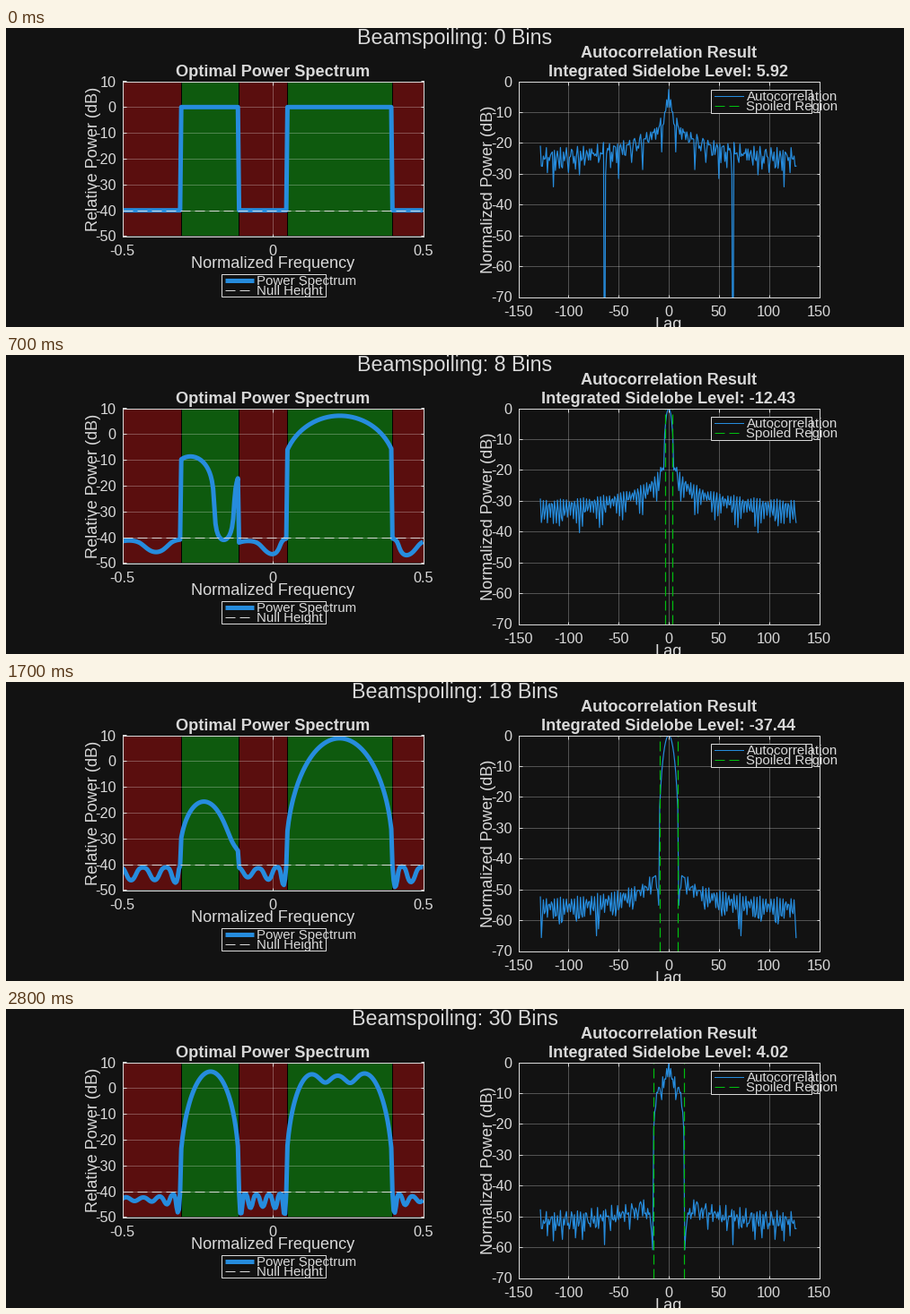
These frames come from a looping animation (1000x334 px, 3000 ms). A matplotlib script:

```python
import numpy as np
import matplotlib.pyplot as plt
from matplotlib.animation import FuncAnimation
from matplotlib.lines import Line2D
from matplotlib.patches import Rectangle

W, H, DPI = 1000, 334, 100
BG, FG, BLUE, GREEN = "#121212", "#d9d9d9", "#268cdd", "#00c010"
N = 256
NULL = 1e-4      # null height, -40 dB
WEIGHT = 2.8e5   # sidelobe norm against the log barrier

plt.rcParams.update({"font.family": "Liberation Sans", "axes.unicode_minus": False,
                     "text.color": FG})

bins = np.arange(N)
freq = np.linspace(-0.5, 0.5, N)
lag = bins - N // 2
in_band = ((bins >= 50) & (bins <= 98)) | ((bins >= 140) & (bins <= 228))
null = ~in_band

LEVELS = [5.92, 2.06, -2.31, -7.14, -12.43, -17.87, -22.86, -27.78,
          -32.65, -37.44, -36.18, -31.09, -20.42, -9.63, -1.28, 4.02]


# ---------- spectrum design ----------
def sidelobe_projector(half):
    """Matrix that keeps only the lags beyond +-half."""
    n = np.subtract.outer(bins, bins)
    kernel = np.ones((N, N))
    for k in range(1, half + 1):
        kernel += 2 * np.cos(2 * np.pi * k * n / N)
    return np.eye(N) - kernel / N


def barrier_weights(half):
    """Wide spoiled regions are held further from the exact optimum."""
    return np.where(in_band, np.exp(0.6 * max(0, half - 9)), 1.0)


def cost(p, A, m):
    return (WEIGHT * np.linalg.norm(A @ p) - (m * np.log(p)).sum()
            - np.log(NULL - p[null]).sum())


def optimise(p, half, steps=50):
    """Damped Newton steps for the smallest sidelobes at fixed total power."""
    A, m = sidelobe_projector(half), barrier_weights(half)
    for _ in range(steps):
        e = A @ p
        t = WEIGHT / np.linalg.norm(e)
        room = NULL - p[null]
        grad = t * e - m / p
        grad[null] += 1 / room
        diag = m.copy()
        diag[null] += (p[null] / room) ** 2
        hess = t * A * np.outer(p, p) + np.diag(diag)
        a, b = np.linalg.solve(hess, np.column_stack([p * grad, p])).T
        u = (p @ a) / (p @ b) * b - a
        if np.abs(u).max() < 1e-4:
            break
        reach = max((-u).max(), (u[null] * p[null] / room).max(), 1e-9)
        step = min(1, 0.95 / reach)
        now = cost(p, A, m)
        while step > 1e-4 and cost(p * (1 + step * u), A, m) > now:
            step /= 2
        p = p * (1 + step * u)
    return p


def design_all():
    spectra = [np.where(in_band, 1.0, NULL)]
    p = np.full(N, NULL / 2)
    p[in_band] = (N - p[null].sum()) / in_band.sum()
    for half in range(1, len(LEVELS)):
        p = optimise(p, half)
        spectra.append(p)
    return spectra


def db(x):
    return 10 * np.log10(np.maximum(np.abs(x), 1e-12))


spectra = design_all()
powers = [db(p) for p in spectra]
correlations = [db(np.fft.fftshift(np.fft.ifft(p))) for p in spectra]


# ---------- layout, in pixels from the top left ----------
fig = plt.figure(figsize=(W / DPI, H / DPI), dpi=DPI, facecolor=BG)


def pt(px):
    return px * 72 / DPI


def text(x, y, s, size, **kw):
    kw.setdefault("va", "baseline")
    return fig.text(x / W, 1 - y / H, s, fontsize=pt(size), **kw)


def plot_area(x0, y0, x1, y1, xlim, ylim, xticks, yticks):
    ax = fig.add_axes([x0 / W, 1 - y1 / H, (x1 - x0) / W, (y1 - y0) / H], facecolor=BG)
    ax.set(xlim=xlim, ylim=ylim)
    ax.set_xticks(xticks, [f"{v:g}" for v in xticks])
    ax.set_yticks(yticks, [f"{v:g}" for v in yticks])
    ax.tick_params(direction="in", top=True, right=True, length=pt(3.5), width=pt(1),
                   color=FG, labelcolor=FG, labelsize=pt(16.2))
    ax.tick_params(axis="x", pad=pt(9.5))
    ax.tick_params(axis="y", pad=pt(7))
    ax.set_axisbelow(True)
    ax.grid(color="white", alpha=0.27, lw=pt(1))
    for s in ax.spines.values():
        s.set(color=FG, linewidth=pt(1))
    return ax


def dashes(px):
    return (0, (pt(11) / pt(px), pt(5) / pt(px)))


def sample(x0, x1, y, **kw):
    fig.add_artist(Line2D([x0 / W, x1 / W], [1 - y / H] * 2, zorder=11, **kw))


def legend(x, y, w, h, rows):
    fig.add_artist(Rectangle((x / W, 1 - (y + h) / H), w / W, h / H, facecolor=BG,
                             edgecolor=FG, lw=pt(1), zorder=10))
    for (label, style), row in zip(rows, (7, 18.5)):
        sample(x + 4, x + 36, y + row, **style)
        text(x + 39.5, y + row + 5.3, label, 15, zorder=12)


left = plot_area(129.5, 59.5, 464.5, 232.5, (-0.5, 0.5), (-50, 10),
                 (-0.5, 0, 0.5), range(-50, 11, 10))
right = plot_area(570.5, 59.5, 905.5, 300.5, (-150, 150), (-70, 0),
                  range(-150, 151, 50), range(-70, 1, 10))

edges = [-0.5, -0.304, -0.114, 0.0486, 0.397, 0.5]
for i, (a, b) in enumerate(zip(edges, edges[1:])):
    color = "#0e5a0e" if i % 2 else "#5a0e0e"
    left.add_patch(Rectangle((a, -50), b - a, 60, facecolor=color, edgecolor="black",
                             lw=pt(1), zorder=0.2))

power_line, = left.plot([], [], color=BLUE, lw=pt(5), solid_joinstyle="round",
                        solid_capstyle="butt", zorder=2.2)
left.axhline(-40, color=FG, lw=pt(1), ls=dashes(1), zorder=2.3)

corr_line, = right.plot([], [], color=BLUE, lw=pt(1.2), zorder=2.2)
limits = [right.axvline(0, color=GREEN, lw=pt(1.2), ls=dashes(1.2), zorder=2.3)
          for _ in range(2)]

heading = text(500, 18, "", 23.3, ha="center")
text(297, 54, "Optimal Power Spectrum", 18.2, ha="center", weight="bold")
text(738, 33, "Autocorrelation Result", 18.2, ha="center", weight="bold")
level = text(738, 54, "", 18.2, ha="center", weight="bold")
text(297, 268, "Normalized Frequency", 18.2, ha="center")
text(738, 336, "Lag", 18.2, ha="center")
text(97, 146, "Relative Power (dB)", 18.2, ha="center", va="center", rotation=90)
text(537, 180, "Normalized Power (dB)", 18.2, ha="center", va="center", rotation=90)

legend(239.5, 274.5, 116, 25, [
    ("Power Spectrum", dict(color=BLUE, lw=pt(5), solid_capstyle="butt")),
    ("Null Height", dict(color=FG, lw=pt(1), ls=dashes(1)))])
legend(785, 68.5, 112, 26, [
    ("Autocorrelation", dict(color=BLUE, lw=pt(1))),
    ("Spoiled Region", dict(color=GREEN, lw=pt(1), ls=dashes(1)))])


# ---------- animation ----------
def stage(tick):
    """Half the spoiled width shown at a 100 ms tick."""
    if tick < 2:
        return tick
    if tick < 5:
        return 2
    return 15 if tick >= 28 else 3 + (tick - 5) // 2


def update(tick):
    half = stage(tick)
    power_line.set_data(freq, powers[half])
    corr_line.set_data(lag, correlations[half])
    for line, side in zip(limits, (-half, half)):
        line.set_xdata([side, side])
        line.set_visible(half > 0)
    heading.set_text(f"Beamspoiling: {2 * half} Bins")
    level.set_text(f"Integrated Sidelobe Level: {LEVELS[half]:.2f}")
    return power_line, corr_line, *limits, heading, level


anim = FuncAnimation(fig, update, frames=30, interval=100, repeat=True,
                     repeat_delay=0, blit=False)
plt.show()
```
